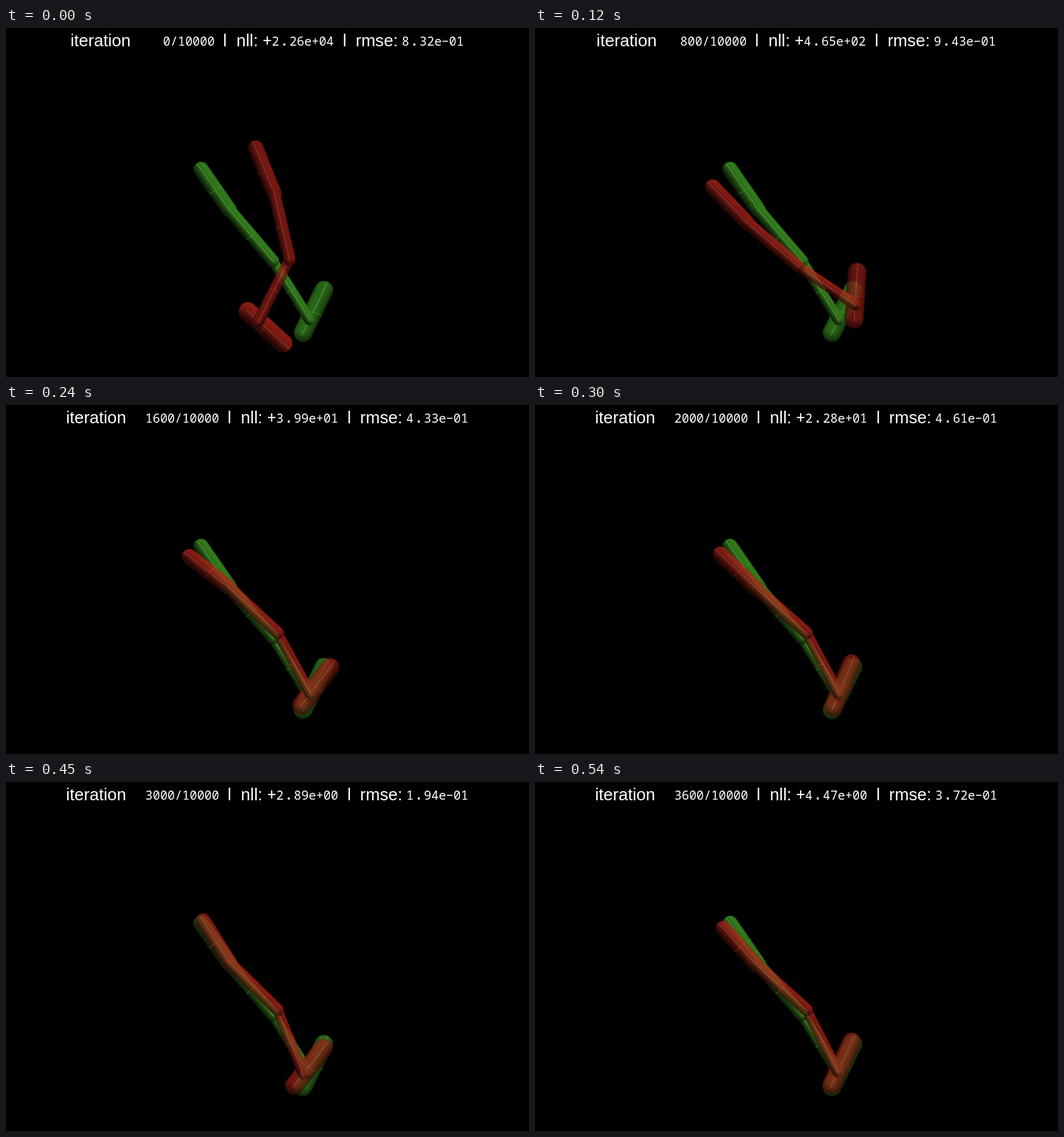
Recreate the animation shown at these times as an HTML page with a canvas. Size 917x611 px, loop 1.57 s.

```html
<!DOCTYPE html>
<html lang="en">
<head>
<meta charset="utf-8">
<title>Arm pose fitting</title>
<style>
  html, body { margin: 0; width: 100%; height: 100%; overflow: hidden; background: #000; }
  canvas, svg { position: absolute; left: 0; top: 0; }
  text { fill: #fff; white-space: pre; font: 29.7px "Liberation Sans", Arial, sans-serif; }
  .mono { font: 21.6px "Noto Sans Mono", "DejaVu Sans Mono", monospace; }
  .big { font-size: 30px; }
</style>
</head>
<body>
<canvas id="stage" width="917" height="611"></canvas>
<svg width="917" height="611">
  <g id="left"><text x="113" y="32">iteration</text></g>
  <g id="right">
    <text id="count" class="mono" x="366" y="31" text-anchor="end"></text>
    <text x="380.6" y="31.5">l</text>
    <text x="404" y="32">nll:</text>
    <text class="mono big" x="449" y="32.5">+</text>
    <text id="nll" class="mono" x="466" y="31"></text>
    <text x="590.6" y="31.5">l</text>
    <text x="613" y="32">rmse:</text>
    <text id="rmse" class="mono" x="694" y="31"></text>
  </g>
</svg>
<script>
const STEP = 30, LAST = 18, LOOP = 1570;
const $ = id => document.getElementById(id);
const ctx = $("stage").getContext("2d");
const layer = document.createElement("canvas");
layer.width = 917;
layer.height = 611;
const layerCtx = layer.getContext("2d");

const GREEN = [66, 165, 36], RED = [232, 48, 34];
const LIGHT = { x: 0.15, y: -0.62, z: 0.52 };
const AMBIENT = 0.22, DIFFUSE = 0.74;

// wrist position and limb angles in degrees
const goal = { x: 468, y: 408, upper: 55, lower: 49.5, fore: 58, foot: -64 };

// key points of the search; a short track holds its last value
const steps = [0, 2, 4, 8, 12, 15, 18];
const tracks = {
  x: [497, 479, 461, 476],
  y: [405, 401, 417, 399],
  upper: [68, 68, 46, 38, 49, 57.5, 47.5],
  lower: [77, 52.5, 40.5, 43, 40, 44.5, 42],
  fore: [116.5, 78, 34, 61.5, 62.5, 68, 63],
  foot: [42, -51.5, -86.5, -53, -82, -52, -65],
  logNll: [2.26e4, 997, 465, 39.9, 13, 2.89, 4.47].map(Math.log),
  rmse: [0.832, 0.447, 0.943, 0.433, 0.489, 0.194, 0.372]
};

const mix = (a, b, f) => a + (b - a) * f;
const rgb = (c, k, a = 1) => `rgba(${c.map(v => Math.round(v * k)).join()},${a})`;

function stateAt(step) {
  const j = Math.max(1, steps.findIndex(s => s >= step));
  const f = (step - steps[j - 1]) / (steps[j] - steps[j - 1]);
  const state = {};
  for (const [name, track] of Object.entries(tracks)) {
    const at = i => track[Math.min(i, track.length - 1)];
    state[name] = mix(at(j - 1), at(j), f);
  }
  return state;
}

// point at a distance from p along an angle
function along(p, deg, dist) {
  const a = deg * Math.PI / 180;
  return { x: p.x + Math.cos(a) * dist, y: p.y + Math.sin(a) * dist };
}

function capsule(g, color, a, b, r0, r1 = r0) {
  const ang = Math.atan2(b.y - a.y, b.x - a.x);
  const ux = Math.cos(ang), uy = Math.sin(ang);
  const px = -uy, py = ux;
  const r = Math.max(r0, r1), q = Math.PI / 2;

  g.save();
  g.beginPath();
  g.arc(a.x, a.y, r0, ang + q, ang + 3 * q);
  g.arc(b.x, b.y, r1, ang - q, ang + q);
  g.closePath();

  const side = g.createLinearGradient(a.x - px * r, a.y - py * r, a.x + px * r, a.y + py * r);
  for (let i = 0; i <= 10; i++) {
    const s = i / 5 - 1;
    const dot = (px * LIGHT.x + py * LIGHT.y) * s + LIGHT.z * Math.sqrt(1 - s * s);
    side.addColorStop(i / 10, rgb(color, AMBIENT + DIFFUSE * Math.max(0, dot)));
  }
  g.fillStyle = side;
  g.fill();
  g.clip();

  // round ends catch or lose the light
  for (const [c, rad, d] of [[a, r0, -1], [b, r1, 1]]) {
    const dot = d * (ux * LIGHT.x + uy * LIGHT.y);
    const tint = dot > 0 ? color : [0, 0, 0];
    const cap = g.createLinearGradient(c.x, c.y, c.x + ux * rad * d, c.y + uy * rad * d);
    cap.addColorStop(0, rgb(tint, 1, 0));
    cap.addColorStop(1, rgb(tint, 1, Math.abs(dot)));
    g.fillStyle = cap;
    g.beginPath();
    g.arc(c.x, c.y, rad + 1, ang - d * q, ang + d * q, d < 0);
    g.fill();
  }

  // lengthwise seam and middle ring
  const pale = color.map(v => mix(v, 220, 0.55));
  g.lineWidth = 1.5;
  g.strokeStyle = rgb(pale, 1, 0.42);
  g.beginPath();
  g.moveTo(a.x - ux * r0 * 0.9, a.y - uy * r0 * 0.9);
  g.lineTo(b.x + ux * r1 * 0.3, b.y + uy * r1 * 0.3);
  g.stroke();

  const mx = (a.x + b.x) / 2, my = (a.y + b.y) / 2;
  g.lineWidth = 1;
  g.strokeStyle = rgb(color, 1, 0.7);
  g.beginPath();
  g.moveTo(mx - px * r, my - py * r);
  g.quadraticCurveTo(mx + ux * 2, my + uy * 2, mx + px * r, my + py * r);
  g.stroke();
  g.restore();
}

function arm(g, color, pose) {
  const elbow = along(pose, pose.lower, -117);
  const shoulder = along(elbow, pose.upper, -87);
  const ankle = along(pose, pose.fore, 121);
  capsule(g, color, shoulder, elbow, 13.5, 13);
  capsule(g, color, along(ankle, pose.foot, 57), along(ankle, pose.foot, -25), 16.5);
  capsule(g, color, pose, ankle, 9, 9.8);
  capsule(g, color, elbow, pose, 11);
}

function sci(el, value) {
  const [mant, exp] = value.toExponential(2).split("e");
  const sign = exp[0] === "-" ? "\u2212" : "+";
  const tail = `${mant.slice(2)}e${sign}${exp.slice(1).padStart(2, "0")}`;
  el.innerHTML = `${mant[0]}<tspan class="big">.</tspan>${tail}`;
}

function draw(step) {
  const state = stateAt(step);
  ctx.clearRect(0, 0, 917, 611);
  arm(ctx, GREEN, goal);
  layerCtx.clearRect(0, 0, 917, 611);
  arm(layerCtx, RED, state);
  ctx.globalAlpha = 0.74;
  ctx.drawImage(layer, 0, 0);
  ctx.globalAlpha = 1;

  const count = String(step * 200);
  const shift = 2.6 * (count.length - 1);
  $("left").setAttribute("transform", `translate(${-shift})`);
  $("right").setAttribute("transform", `translate(${shift})`);
  $("count").textContent = count + "/10000";
  sci($("nll"), Math.exp(state.logNll));
  sci($("rmse"), state.rmse);
}

const start = performance.now();
let shown = -1;
function tick() {
  const t = (performance.now() - start) % LOOP;
  const step = Math.min(LAST, Math.floor(t / STEP));
  if (step !== shown) draw(shown = step);
  requestAnimationFrame(tick);
}
tick();
</script>
</body>
</html>
```
